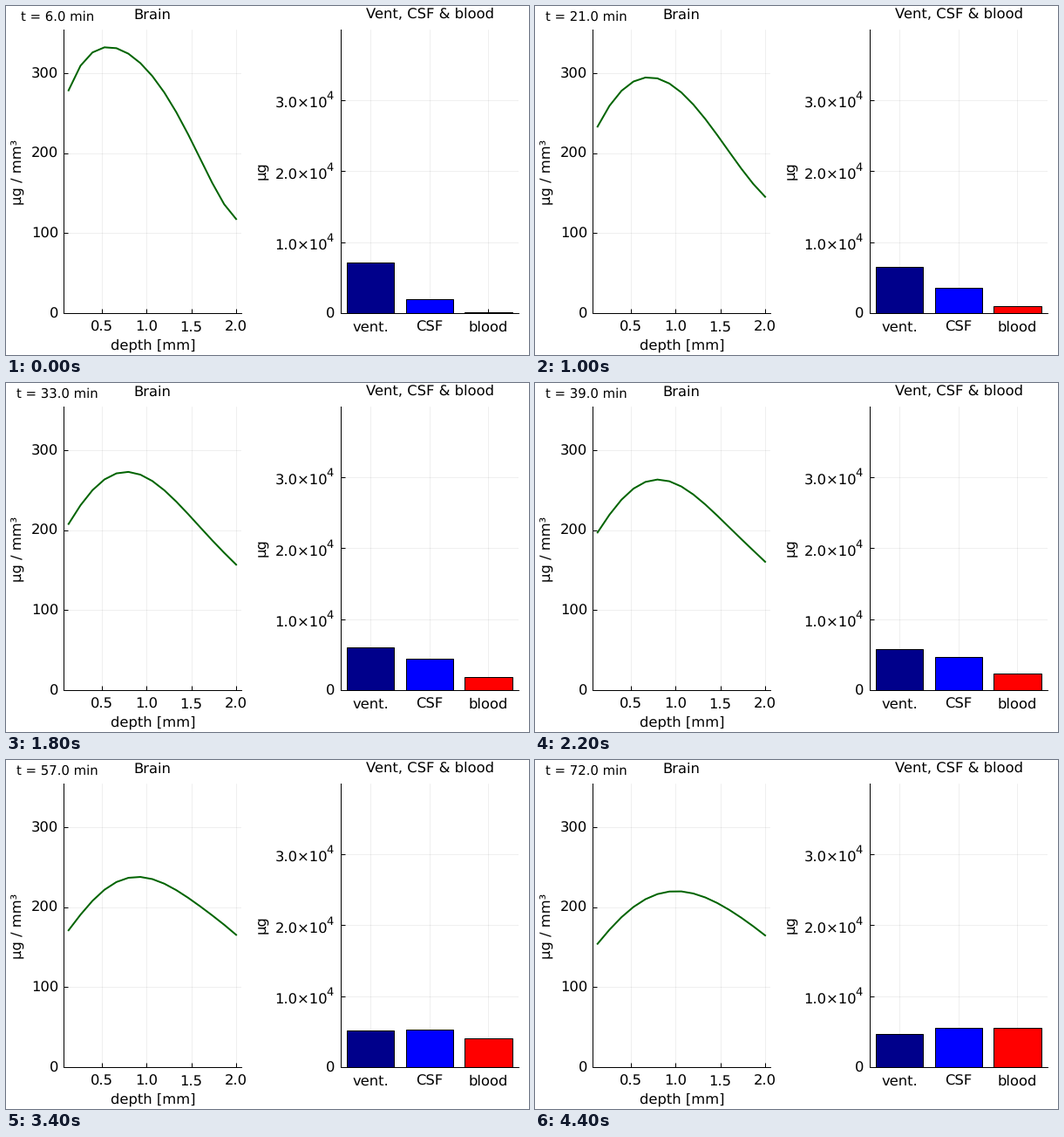
Recreate the animation shown at these times as a matplotlib script. Size 600x400 px, loop 4.6 s.

```python
import numpy as np
import matplotlib.pyplot as plt
from matplotlib.animation import FuncAnimation

W, H, DPI = 600, 400, 100
PX = 72 / DPI  # points per pixel
FRAMES, STEP = 23, 200
BODY, SMALL, EXPONENT = 16.4, 14.9, 13
LEFT, BOTTOM = 66, 352

plt.rcParams["font.family"] = "DejaVu Sans"
plt.rcParams["text.hinting"] = "none"

# Key states at the start, in between and at the end
key_minutes = np.array([6, 27, 72])
key_depths = np.array([0, 2, 5, 9, 12, 14]) / 7 - 1
key_curve = [[278.7, 326.2, 324.6, 251.4, 163.0, 117.7],
             [219.8, 263.4, 283.1, 239.4, 184.8, 152.1],
             [154.3, 187.6, 216.5, 212.3, 187.0, 164.8]]
key_bars = [[7162, 2027, 170], [6204, 4042, 1388], [4656, 5516, 5565]]

depth = np.linspace(2 / 15, 2, 15)


def pace(t):
    """Diffusive time scale: changes slow down like a square root."""
    return np.sqrt(t + 10)


def blend(keys, t):
    """Smooth passage through the three key states."""
    return np.polyval(np.polyfit(pace(key_minutes), keys, 2), pace(t)[:, None])


def profile(points):
    """Smooth curve through the key depths, sampled at every depth."""
    return np.polyval(np.polyfit(key_depths, points, 5), np.linspace(-1, 1, 15))


minutes = 6.0 + 3 * np.arange(FRAMES)
curves = [profile(points) for points in blend(key_curve, minutes)]
heights = blend(key_bars, minutes)

fig = plt.figure(figsize=(W / DPI, H / DPI), dpi=DPI, facecolor="white")


def label(x, y, text, size=BODY, ha="center"):
    """Text with its baseline at pixel (x, y), measured from the top left."""
    return fig.text(x / W, 1 - y / H, text, fontsize=size * PX, ha=ha,
                    va="baseline", color="black")


def side_label(x, y, text):
    return fig.text(x / W, 1 - y / H, text, fontsize=BODY * PX, ha="right",
                    va="center", rotation=90, color="black")


def panel(left, xlim, ylim, xticks, yticks):
    width, height = 203.8, BOTTOM - 27
    ax = fig.add_axes([left / W, 1 - BOTTOM / H, width / W, height / H])
    ax.set(xlim=xlim, ylim=ylim, xticks=xticks, yticks=yticks)
    ax.set_axisbelow(True)
    ax.grid(color="black", alpha=0.1, linewidth=0.6 * PX)
    ax.tick_params(direction="in", length=5 * PX, width=PX,
                   labelbottom=False, labelleft=False)
    ax.spines[["top", "right"]].set_visible(False)
    ax.spines[["left", "bottom"]].set_linewidth(PX)
    return ax


# Brain panel
depth_ticks, level_ticks = [0.5, 1, 1.5, 2], [0, 100, 200, 300]
brain = panel(LEFT, (0.0773, 2.056), (0, 354.8), depth_ticks, level_ticks)
curve, = brain.plot(depth, curves[0], color="#006400", linewidth=2 * PX)
label(167.8, 14.5, "Brain")
label(168.3, 393.5, "depth [mm]")
side_label(22.4, 190, "µg / mm³")
for v in depth_ticks:
    label(58.1 + 103 * v, 372.5, f"{v:.1f}")
for v in level_ticks:
    label(60, 357.4 - 0.916 * v, str(v), ha="right")

# Compartment panel
centers = np.array([0.5, 1.5, 2.5])
tanks = panel(LEFT + 318, (-0.009, 3.009), (0, 39930),
              centers, [0, 10000, 20000, 30000])
bars = tanks.bar(centers, heights[0], width=0.803, linewidth=PX,
                 color=["#00008b", "#0000ff", "#ff0000"], edgecolor="black")
label(486.8, 14.5, "Vent, CSF & blood")
side_label(302, 188.5, "µg")
for x, name in zip(384.9 + 67.5 * centers, ("vent.", "CSF", "blood")):
    label(x, 372.5, name)
label(377, 357.4, "0", ha="right")
for n in (1, 2, 3):
    y = BOTTOM - 81.4 * n
    label(369, y + 9.4, f"{n}.0×10", ha="right")
    label(367.8, y - 0.6, "4", EXPONENT, ha="left")

clock = label(58.8, 17, "", SMALL)


def update(i):
    curve.set_ydata(curves[i])
    for bar, height in zip(bars, heights[i]):
        bar.set_height(height)
    clock.set_text(f"t = {minutes[i]:.1f} min")
    return [curve, *bars, clock]


anim = FuncAnimation(fig, update, frames=FRAMES, interval=STEP,
                     repeat=True, repeat_delay=0, blit=False)
plt.show()
```
